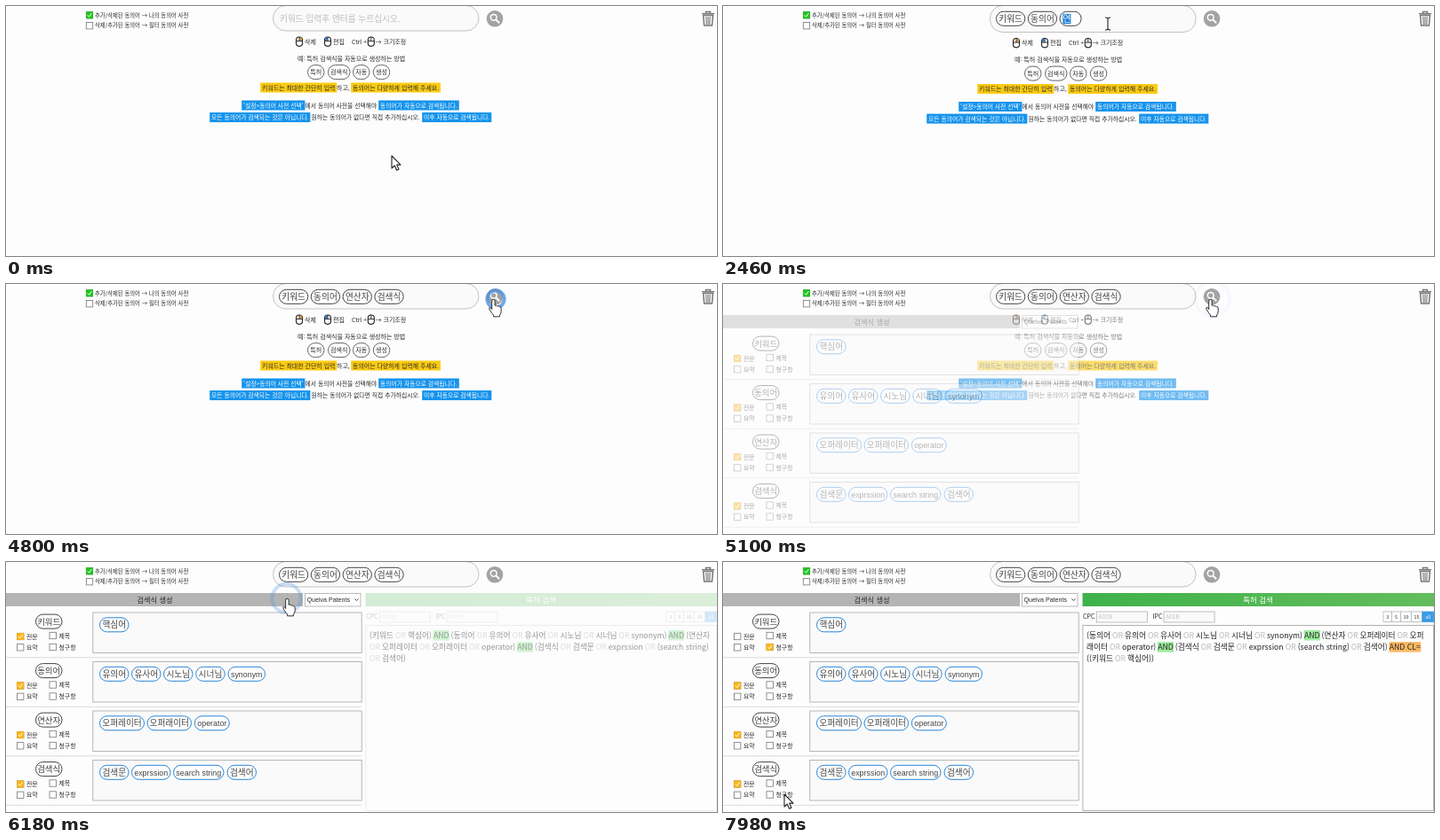
Recreate the animation shown at these times as an HTML page. Size 800 by 282 pixels, loop 8000 ms.

```html
<!DOCTYPE html>
<html lang="ko">
<head>
<meta charset="utf-8">
<style>
html, body { margin: 0; width: 100%; height: 100%; overflow: hidden; background: #fefdfe; }
svg { display: block; width: 100vw; height: 100vh; cursor: default; }
text { font-family: 'Noto Sans CJK KR', 'Noto Sans CJK', 'Noto Sans CJK JP', sans-serif; white-space: pre; }
.latin { font-family: 'Liberation Sans', sans-serif; }
</style>
</head>
<body>
<svg id="stage" viewBox="0 0 800 282"></svg>
<script>
const LOOP = 8000;
const stage = document.getElementById('stage');
const INK = '#2a2a2a';

function el(parent, tag, attrs = {}, text) {
  const node = document.createElementNS('http://www.w3.org/2000/svg', tag);
  set(node, attrs);
  if (text !== undefined) node.textContent = text;
  parent.appendChild(node);
  return node;
}
function set(node, attrs) {
  for (const k in attrs) node.setAttribute(k, attrs[k]);
}
const group = parent => el(parent, 'g');
const show = (node, on) => set(node, { opacity: +on });
const rect = (p, x, y, width, height, attrs) => el(p, 'rect', { x, y, width, height, ...attrs });
const path = (p, d, attrs) => el(p, 'path', { d, fill: 'none', ...attrs });

// Text whose glyphs are centred vertically on cy
function label(p, x, cy, size, text, attrs = {}) {
  return el(p, 'text', { x, y: cy + size * .37, 'font-size': size, fill: INK, ...attrs }, text);
}
function pill(p, x, cy, w, text, size, stroke, attrs = {}) {
  const g = group(p);
  rect(g, x, cy - 8, w, 16, { rx: 8, fill: '#fefefe', stroke, 'stroke-width': 1 });
  label(g, x + w / 2, cy, size, text, { 'text-anchor': 'middle', fill: '#444', ...attrs });
  return g;
}
function checkbox(p, x, cy, color) {
  const g = group(p);
  rect(g, x + .5, cy - 3.7, 7.4, 7.4, { fill: '#fff', stroke: '#777', 'stroke-width': .8 });
  const mark = group(g);
  rect(mark, x + .2, cy - 4, 8, 8, { rx: .8, fill: color });
  path(mark, `M${x + 2} ${cy}l1.7 1.9 2.8-4`, { stroke: '#fff', 'stroke-width': 1 });
  return mark;
}
function marked(p, x, cy, size, text, bg, fill = INK, pad = 1.8, h = 11) {
  const t = label(p, x, cy, size, text, { fill });
  const w = t.getComputedTextLength();
  if (bg) p.insertBefore(rect(p, x - pad, cy - h / 2, w + pad * 2, h, { fill: bg }), t);
  return w;
}

// Top bar
label(stage, 100, 10.2, 6.35, '추가/삭제된 동의어 → 나의 동의어 사전');
label(stage, 100, 22, 6.35, '삭제/추가된 동의어 → 필터 동의어 사전');
checkbox(stage, 89.8, 10.3, '#22c322');
show(checkbox(stage, 89.8, 22.2, '#22c322'), false);

const box = rect(stage, 300.5, -.5, 231.5, 28.5, { rx: 14.2, fill: '#fafafa', stroke: '#bbb', 'stroke-width': .9 });
const hint = label(stage, 308, 14, 9.7, '키워드 입력후 엔터를 누르십시오.', { fill: '#bdbdbd' });

el(stage, 'circle', { cx: 550, cy: 14.3, r: 9.3, fill: '#a3a3a3' });
el(stage, 'circle', { cx: 548.7, cy: 12.8, r: 3.4, fill: 'none', stroke: '#fff', 'stroke-width': 1.5 });
path(stage, 'M551.3 15.4l3.8 3.8', { stroke: '#fff', 'stroke-width': 2 });

path(stage, 'M783 8.7h14M787.5 8v-1.6h5V8', { stroke: '#777', 'stroke-width': 1.5 });
path(stage, 'M784.6 10.5l1 11.5h8.8l1-11.5z', { stroke: '#777', 'stroke-width': 1.5 });
path(stage, 'M787.8 12l.4 9M790 12v9M792.2 12l-.4 9', { stroke: '#777', 'stroke-width': 1.1 });

// Help block
const help = group(stage);
function mouse(x, side, color) {
  rect(help, x - 3.5, 35, 7, 10.4, { rx: 3.3, fill: '#fff', stroke: '#222', 'stroke-width': 1.1 });
  if (color) rect(help, side < 0 ? x - 2.9 : x + .2, 35.6, 2.7, 3.6, { rx: 1, fill: color });
  path(help, `M${x - 3.5} 39.6h7M${x} 35v4.6`, { stroke: '#222', 'stroke-width': .9 });
}
mouse(330, 1, '#e8962e');
mouse(362, -1, '#2f7fe0');
mouse(410.8);
label(help, 336, 40.3, 7, '삭제');
label(help, 368, 40.3, 7, '편집');
label(help, 389, 40.3, 6.8, 'Ctrl +');
label(help, 415.5, 40.3, 7, '→ 크기조정');
label(help, 328, 59.3, 7, '예: 특허 검색식을 자동으로 생성하는 방법');
[['특허', 339.5, 18.5], ['검색식', 362.5, 24.5], ['자동', 390.5, 18.5], ['생성', 413.3, 18.5]]
  .forEach(([s, x, w]) => pill(help, x, 74.6, w, s, 7, '#666', { fill: INK }));
const YELLOW = '#fbcb12', BLUE = '#1593ec';
marked(help, 288, 92, 6.95, '키워드는 최대한 간단히 입력', YELLOW);
marked(help, 372, 92, 6.95, '하고,');
marked(help, 390, 92, 6.95, '동의어는 다양하게 입력해 주세요.', YELLOW);
marked(help, 267, 112, 6.8, "'설정>동의어 사전 선택'", BLUE, '#fff');
marked(help, 336.5, 112, 6.8, '에서 동의어 사전을 선택해야');
marked(help, 421, 112, 6.8, '동의어가 자동으로 검색됩니다.', BLUE, '#fff');
marked(help, 231, 125.6, 6.8, '모든 동의어가 검색되는 것은 아닙니다.', BLUE, '#fff');
marked(help, 343.5, 125.6, 6.8, '원하는 동의어가 없다면 직접 추가하십시오.');
marked(help, 470, 125.6, 6.8, '이후 자동으로 검색됩니다.', BLUE, '#fff');

// Left panel: keywords with synonyms
const left = group(stage);
rect(left, 0, 35, 334, 15, { fill: '#b4b4b4' });
label(left, 167.5, 42.6, 8.2, '검색식 생성', { 'text-anchor': 'middle', 'font-weight': 500 });
rect(left, 336.5, 35.5, 62.5, 14.5, { fill: '#fff', stroke: '#aaa', 'stroke-width': .8 });
label(left, 338.5, 42.4, 7.1, 'Quelva Patents', { class: 'latin' });
path(left, 'M392.5 41.5l2 2 2-2', { stroke: '#333', 'stroke-width': .9 });

const rows = [
  ['키워드', [['핵심어', 105.5, 32.5]]],
  ['동의어', [['유의어', 105.5, 32.5], ['유사어', 141.5, 32.5], ['시노님', 177.5, 32.5], ['시너님', 213.7, 32.5], ['synonym', 250, 41.5]]],
  ['연산자', [['오퍼레이터', 105.5, 50], ['오퍼래이터', 159, 49.5], ['operator', 212.3, 39]]],
  ['검색식', [['검색문', 105.5, 32.5], ['exprssion', 141.5, 43.5], ['search string', 188.5, 56.5], ['검색어', 249, 32.5]]]
];
const checks = rows.map(([name, words], i) => {
  const y = i * 55.5;
  pill(left, 33.5, y + 67.1, 29.5, name, 9.5, '#444');
  rect(left, 97.8, y + 57, 302.4, 45.5, { fill: '#fafafa', stroke: '#a6a6a6', 'stroke-width': .8 });
  words.forEach(([s, x, w]) => {
    const latin = /[a-z]/.test(s);
    pill(left, x, y + 70.8, w, s, latin ? 8.9 : 9.7, '#2a86d8', latin ? { class: 'latin' } : {});
  });
  path(left, `M0 ${y + 107.8}h400`, { stroke: '#d6d6d6', 'stroke-width': .9 });
  return [['전문', 12, 84], ['제목', 48.5, 83], ['요약', 12, 96.3], ['청구항', 48.5, 96]].map(([s, x, cy]) => {
    label(left, x + 11, y + cy, 6.9, s);
    const mark = checkbox(left, x, y + cy, '#fbb515');
    show(mark, s === '전문');
    return mark;
  });
});

// Right panel: generated query
const right = group(stage);
const grad = el(el(stage, 'defs'), 'linearGradient', { id: 'green' });
el(grad, 'stop', { offset: 0, 'stop-color': '#3fb24a' });
el(grad, 'stop', { offset: 1, 'stop-color': '#63bd5c' });
rect(right, 404.5, 35, 395.5, 15, { fill: 'url(#green)' });
label(right, 602, 42.6, 8.5, '특허 검색', { 'text-anchor': 'middle', fill: '#fff', 'font-weight': 500 });
[['CPC', 405, 420], ['IPC', 483.5, 495.8]].forEach(([s, x, bx]) => {
  label(right, x, 61.8, 7, s);
  rect(right, bx + .3, 56, 57, 12, { fill: '#fafafa', stroke: '#b0b0b0', 'stroke-width': .8 });
  label(right, bx + 2.5, 62, 6.5, 'A01B', { fill: '#c0c0c0' });
});
[['3', 743, 9.5], ['5', 752.5, 10], ['10', 762.5, 11.8], ['15', 774.3, 12.5], ['all', 786.8, 13]].forEach(([s, x, w]) => {
  const on = s === 'all';
  rect(right, x, 56, w, 11.6, { fill: on ? '#3a9be6' : '#fff', stroke: on ? '#3a9be6' : '#aaa', 'stroke-width': .7 });
  label(right, x + w / 2, 61.8, 5.4, s, { 'text-anchor': 'middle', fill: on ? '#fff' : INK });
});
rect(right, 404.9, 71.5, 394.6, 209, { fill: '#fefefe', stroke: '#a0a0a0', 'stroke-width': .8 });

function query(lines) {
  const g = group(stage), size = 8.72;
  lines.forEach((line, i) => {
    let x = 409;
    line.split(/(AND CL=|\bAND\b|\bOR\b)/).map(s => s.trim()).filter(Boolean).forEach(s => {
      const bg = s === 'AND' ? '#9deb9f' : s === 'AND CL=' ? '#fdb863' : null;
      x += marked(g, x, 82.7 + i * 13.2, size, s, bg, s === 'OR' ? '#b8b8b8' : '#222', .3, 11.5) + size * .224;
    });
  });
  return g;
}
const queryA = query([
  '(키워드 OR 핵심어) AND (동의어 OR 유의어 OR 유사어 OR 시노님 OR 시너님 OR synonym) AND (연산자',
  'OR 오퍼레이터 OR 오퍼래이터 OR operator) AND (검색식 OR 검색문 OR exprssion OR (search string)',
  'OR 검색어)'
]);
const queryB = query([
  '(동의어 OR 유의어 OR 유사어 OR 시노님 OR 시너님 OR synonym) AND (연산자 OR 오퍼레이터 OR 오퍼',
  '래이터 OR operator) AND (검색식 OR 검색문 OR exprssion OR (search string) OR 검색어) AND CL=',
  '((키워드 OR 핵심어))'
]);

// Typed keywords: start, commit time, composition steps
const typed = [
  [1080, 1560, 'ㅋ 키 키ㅇ 키우 키워 키워ㄷ 키워드'],
  [1620, 2160, 'ㄷ 도 동 동ㅇ 동으 동의 동의ㅇ 동의어'],
  [2340, 2820, 'ㅇ 여 연 연ㅅ 연사 연산 연산ㅈ 연산자'],
  [2940, 3480, 'ㄱ 거 검 검ㅅ 검새 검색 검색ㅅ 검색시 검색식']
].map(([start, commit, s]) => ({ start, commit, steps: s.split(' ') }));
const STEP = 60, GLYPH = 8.92, SUBMIT = 4720;
const chipX = i => 307.5 + i * 35.8;
const chips = typed.map((w, i) => pill(stage, chipX(i), 14.3, 32.3, w.steps.at(-1), 9.7, '#444'));

const input = group(stage);
const inputBox = rect(input, 0, 6.3, 15, 16, { rx: 7.6, fill: '#fefefe', stroke: '#444', 'stroke-width': 1 });
const done = label(input, 3.3, 14.3, 9.7, '', { fill: '#444' });
const compose = rect(input, 0, 8.8, GLYPH, 11.4, { fill: '#1e7fd8' });
const composing = label(input, 0, 14.3, 9.7, '', { fill: '#fff' });
const caret = rect(stage, 0, 9.3, .9, 10.6, { fill: '#333' });

// Pointer
const ring = el(stage, 'circle', { fill: 'none', stroke: '#4a90e2', 'stroke-width': 4 });
const pointer = group(stage);
const body = { fill: '#fff', stroke: '#222', 'stroke-width': 1.1, 'stroke-linejoin': 'round' };
const shapes = {
  arrow: path(pointer, 'M0 0V14l3.3-3 2.3 5.3 2.4-1-2.3-5.2H10z', body),
  hand: path(pointer, 'M-2 13V2a2 2 0 0 1 4 0v6q2-1 3 .8q2-.8 3 .8q2.2-.4 2.2 2v4q0 3-2 5v2h-8v-2q-2-2-5-7q-1.6-3 .3-3.4q1.2 0 2.5 2.8z',
    { ...body, transform: 'translate(-.6 .4) scale(.86)' }),
  beam: path(pointer, 'M-3-7q3 0 3 1.5q0-1.5 3-1.5M0-5.5v11M-3 7q3 0 3-1.5q0 1.5 3 1.5', { stroke: '#222', 'stroke-width': 1.1 })
};
const route = [
  [60, 434, 169], [600, 433, 20], [4260, 433, 20], [4640, 549, 17], [5220, 549, 17],
  [5800, 317, 41], [6300, 317, 41], [6840, 72, 95], [7260, 72, 95], [7700, 69, 262]
];
const clicks = [[600, 433, 20], [SUBMIT, 551, 17], [5900, 315.5, 41], [7080, 71.5, 97]];

const ramp = (t, a, b) => Math.min(1, Math.max(0, (t - a) / (b - a)));
const ease = p => p < .5 ? 4 * p ** 3 : 1 - 4 * (1 - p) ** 3;

function position(t) {
  let [, x, y] = route[0];
  for (let i = 1; i < route.length; i++) {
    const p = ease(ramp(t, route[i - 1][0], route[i][0]));
    x += (route[i][1] - route[i - 1][1]) * p;
    y += (route[i][2] - route[i - 1][2]) * p;
  }
  return [x, y];
}
function shapeAt(x, y, t) {
  if (Math.hypot(x - 550, y - 14.3) < 10) return 'hand';
  if (t >= 3480 && x > 307 && x < 447 && y > 6 && y < 22.5) return 'hand';
  if (x > 300 && x < 532 && y < 29) return 'beam';
  if (t > 5100 && x < 334 && y > 35 && y < 50) return 'hand';
  return 'arrow';
}

function drawInput(t) {
  const open = t >= 1080 && t < SUBMIT;
  const n = typed.filter(w => t >= w.commit).length;
  chips.forEach((c, i) => show(c, i < n));
  show(hint, t < 1080);
  show(input, open);
  set(box, { height: open ? 30 : 28.5 });
  set(help, { transform: `translate(0 ${open ? 1.5 : 0})` });

  const w = typed[n];
  const text = w && t >= w.start ? w.steps[Math.min(w.steps.length - 1, Math.floor((t - w.start) / STEP))] : '';
  const end = 3.3 + Math.max(0, text.length - 1) * GLYPH;
  set(input, { transform: `translate(${chipX(n)} 0)` });
  set(inputBox, { width: 15 + text.length * GLYPH });
  done.textContent = text.slice(0, -1);
  composing.textContent = text.slice(-1);
  set(composing, { x: end });
  set(compose, { x: end });
  show(compose, Boolean(text));
  show(caret, (t >= 900 && t < 1080) || (open && !text && !(t >= 3720 && t < 4080)));
  set(caret, { x: open ? chipX(n) + 3.3 : 310.5 });
}

function draw(t) {
  drawInput(t);
  const results = ramp(t, 4900, 5420);
  const panel = ramp(t, 6080, 6540);
  show(help, 1 - results);
  show(left, results);
  show(right, panel);
  show(queryA, t < 7380 ? Math.sqrt(panel) : 0);
  show(queryB, t >= 7380);
  show(checks[0][0], t < 7080);
  show(checks[0][3], t >= 7080);

  const [x, y] = position(t);
  const kind = shapeAt(x, y, t);
  set(pointer, { transform: `translate(${x} ${y})` });
  for (const k in shapes) show(shapes[k], k === kind);

  const hit = clicks.find(c => t >= c[0] && t < c[0] + 400);
  show(ring, 0);
  if (hit) {
    const p = (t - hit[0]) / 400;
    set(ring, { cx: hit[1], cy: hit[2], r: 7 + 13 * p, opacity: 1 - p });
  }
}

const began = performance.now();
function tick() {
  draw((performance.now() - began) % LOOP);
  requestAnimationFrame(tick);
}
tick();
</script>
</body>
</html>
```
